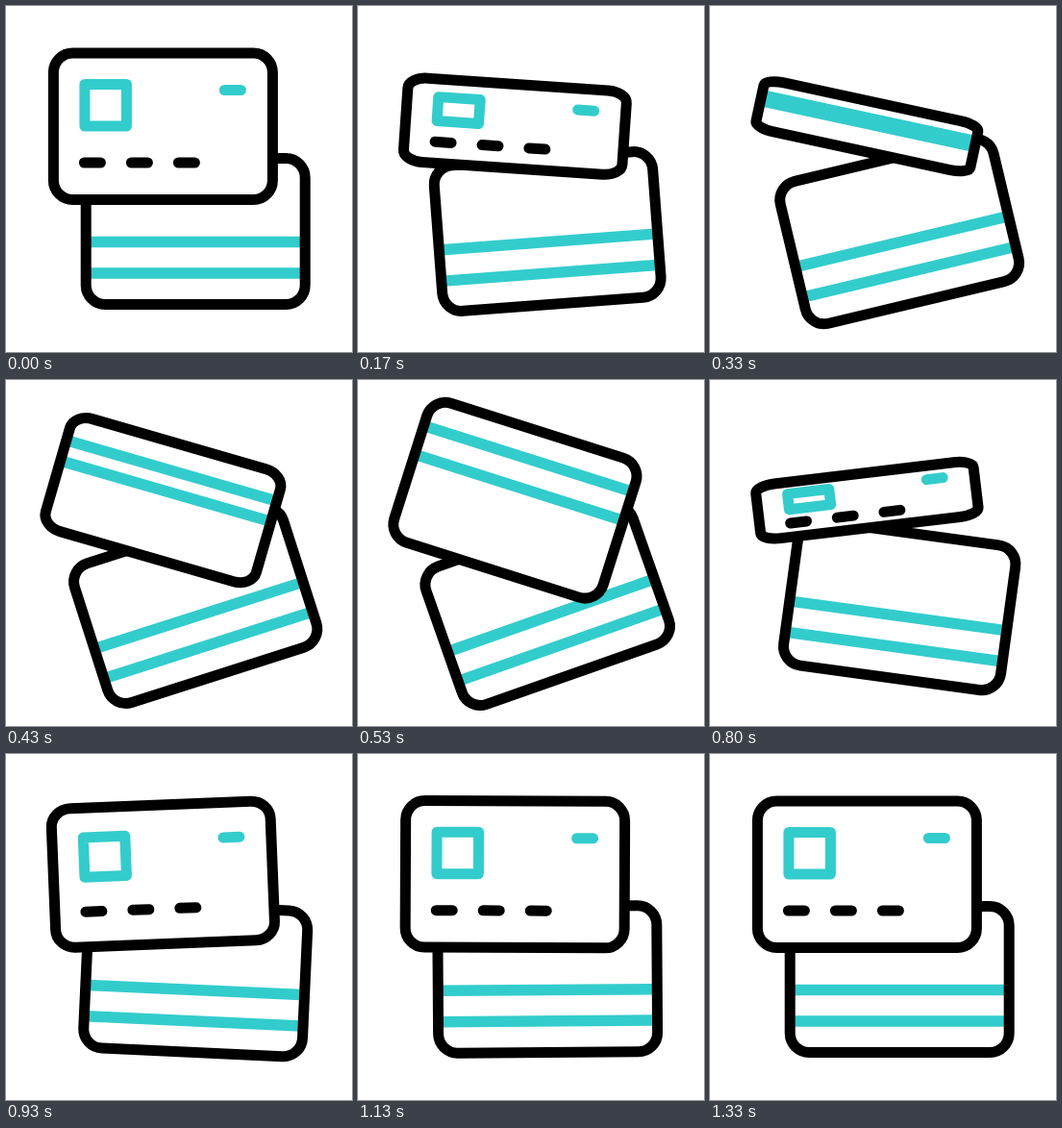
Animation, 360 px wide and 360 px high, one loop 2 s. Source, as an HTML page:

```html
<!DOCTYPE html>
<html lang="en">
<head>
<meta charset="utf-8">
<title>Flipping cards</title>
<style>
  html, body { margin: 0; width: 100%; height: 100%; overflow: hidden; background: #fff; }
  svg { display: block; width: 100%; height: 100%; }
  path { fill: none; stroke-width: 11; stroke-linecap: round; stroke-linejoin: round; }
  rect { fill: none; stroke: #000; stroke-width: 11; }
  .paper { fill: #fff; stroke: none; }
  .teal { stroke: #33cccc; }
  .dark { stroke: #000; }
  .stripes { stroke: #33cccc; stroke-width: 11.5; stroke-linecap: butt; }
</style>
</head>
<body>
<svg viewBox="0 0 360 360">
  <g id="back">
    <rect class="paper" x="-114" y="-76" width="228" height="152" rx="20"/>
    <path class="stripes" d="M-111 11H111M-111 43.4H111"/>
    <rect x="-114" y="-76" width="228" height="152" rx="20"/>
  </g>
  <g id="front">
    <rect class="paper edge" x="-114" width="228" rx="20"/>
    <path class="stripes" id="stripes"/>
    <path class="teal" id="chip"/>
    <path class="dark" id="dashes"/>
    <rect class="edge" x="-114" width="228" rx="20"/>
  </g>
</svg>
<script>
  const LOOP = 2000, FPS = 30, HEIGHT = 152.5;
  const $ = id => document.getElementById(id);
  const edges = document.querySelectorAll('.edge');

  const sine = p => (1 - Math.cos(Math.PI * p)) / 2;
  const linear = p => p;

  // Tracks are [frame, degrees] pairs.
  const backTurn = [[0, 0], [16, -19.4], [24.5, 8], [32, -4], [36, 3.2], [40, 0]];
  const frontTurn = [[0, 0], [16, 17.6], [24.5, -7], [32, 3.5], [36, -3], [40, 0]];
  const flip = [[0, 0], [16, 176], [20, 117.5], [29.5, 0]];

  function sample(track, frame, ease) {
    const i = track.findIndex(key => key[0] > frame);
    if (i < 0) return track[track.length - 1][1];
    const [f0, v0] = track[i - 1], [f1, v1] = track[i];
    return v0 + (v1 - v0) * ease((frame - f0) / (f1 - f0));
  }

  const line = (x0, x1, y) => `M${x0} ${y}H${x1}`;

  function place(id, x, y, turn) {
    $(id).setAttribute('transform', `translate(${x} ${y}) rotate(${turn})`);
  }

  function drawFront(angle) {
    const c = Math.cos(angle), s = Math.abs(c);
    for (const edge of edges) {
      edge.setAttribute('y', -HEIGHT * s / 2);
      edge.setAttribute('height', HEIGHT * s);
      edge.setAttribute('ry', 20 * s);
    }
    const face = c >= 0;
    const squeeze = s ** 1.55; // stripes close up faster than the card
    $('stripes').setAttribute('d', face ? '' :
      line(-111, 111, -45.5 * squeeze) + line(-111, 111, -14 * squeeze));
    $('chip').setAttribute('d', face ?
      `M-81.5 ${-43.7 * s}H-38V${-0.2 * s}H-81.5Z` + line(64, 81, -37.7 * s) : '');
    $('dashes').setAttribute('d', face ?
      [-82, -33, 16].map(x => line(x, x + 17, 37.8 * s)).join('') : '');
  }

  function draw(now) {
    const frame = Math.floor((now % LOOP + 4) * FPS / 1000);
    place('back', 197.2, 234.5, sample(backTurn, frame, sine));
    place('front', 163.4, 125.2, sample(frontTurn, frame, sine));
    drawFront(sample(flip, frame, linear) * Math.PI / 180);
  }

  const start = performance.now();
  function tick() {
    draw(performance.now() - start);
    requestAnimationFrame(tick);
  }
  tick();
</script>
</body>
</html>
```
